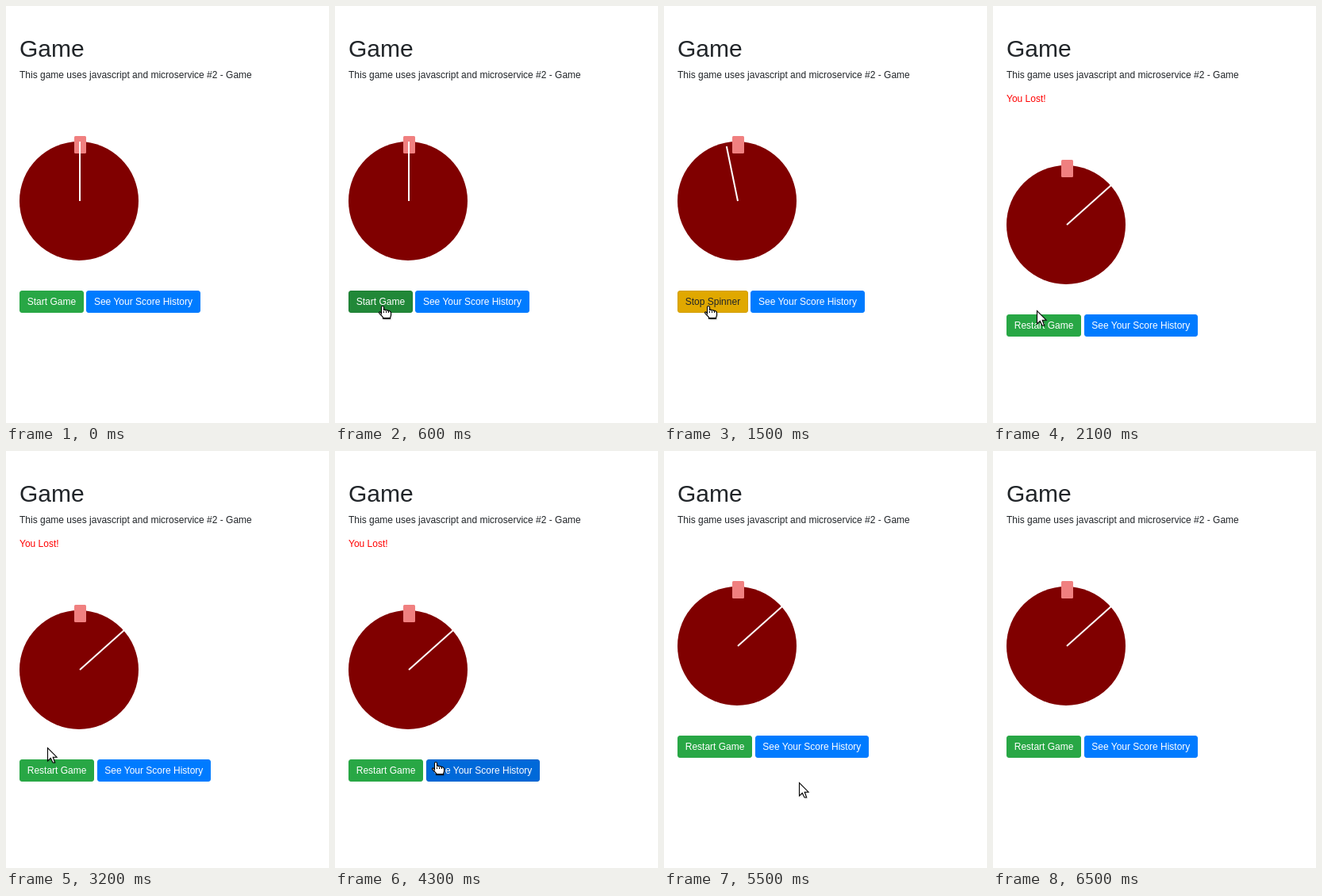
Animation of 407x526 px, one loop 7300 ms. Source, as an HTML page with a canvas:

```html
<!DOCTYPE html>
<html lang="en">
<head>
<meta charset="utf-8">
<title>Game</title>
<style>
  html, body { margin: 0; width: 100%; height: 100%; overflow: hidden; background: #fff; }
  body { position: relative; font: 12px/18px "Liberation Sans", Arial, sans-serif; color: #212529; }
  h1, p, .row, canvas { position: absolute; margin: 0; white-space: nowrap; }
  h1 { left: 17px; top: 36px; font-size: 30px; line-height: 36px; font-weight: 400; }
  p { left: 17px; top: 78px; }
  #lost { top: 108px; color: #f00; }
  .row { left: 17px; display: flex; gap: 3.33px; }
  .row span { padding: 4px 8.75px; border: 1px solid; border-radius: 3px; color: #fff; }
  canvas { left: 0; top: 0; }
</style>
</head>
<body>
<h1>Game</h1>
<p>This game uses javascript and microservice #2 - Game</p>
<p id="lost">You Lost!</p>
<div class="row" id="row"><span id="play"></span><span id="history">See Your Score History</span></div>
<canvas id="stage" width="407" height="526"></canvas>
<script>
const LOOP = 7300, STEP = 100;
const SPIN_START = 1100, SPIN_END = 2000, LOST_END = 5200;
const SPIN_RATE = 0.871, REST_ANGLE = 48.2;
const get = id => document.getElementById(id);
const ctx = get('stage').getContext('2d');

// time, x, y and shape of the pointer; each entry holds until the next
const POINTER = [
  [200, 4, 404, 'arrow'], [300, 40, 396, 'arrow'], [400, 87, 381, 'hand'],
  [500, 70, 379, 'hand'], [600, 55, 378, 'hand'], [700, 51, 378, 'hand'],
  [2100, 55, 384, 'arrow'], [3200, 52, 374, 'arrow'], [3300, 51, 372, 'arrow'],
  [4100, 60, 375, 'arrow'], [4200, 91, 381, 'arrow'], [4300, 122, 392, 'hand'],
  [4400, 146, 398, 'hand'], [4500, 157, 400, 'hand'], [4900, 158, 401, 'hand'],
  [5100, 161, 401, 'hand'], [5200, 168, 404, 'arrow'], [5300, 170, 406, 'arrow'],
  [5500, 170, 418, 'arrow'], [5600, 170, 438, 'arrow'], [5700, 169, 456, 'arrow'],
  [5800, 168, 464, 'arrow'], [6000, 168, 471, 'arrow'], [6100, 160, 435, 'arrow'],
  [6200, 120, 325, 'arrow'], [6300, 58, 185, 'arrow'], [6400, 8, 75, 'arrow'],
  [6500, 0, 0, '']
];

const SHAPES = {
  arrow: new Path2D('M.5 .5V17L4.3 13.4L7 19H9.6L7.2 12.2H12Z'),
  hand: new Path2D('M3.5 10V2Q3.5 .5 5 .5T6.5 2V5.5Q8 4.5 9 6Q10.5 5 12 6.5' +
    'Q13.5 5.8 14.5 7.5Q15.5 8 15.5 9V12L14.5 15V16.5H5.5V14.5L1 10Q0 8.5 1 8T3.5 10Z')
};

function paint(el, fill, edge = fill, ink = '#fff') {
  el.style.background = fill;
  el.style.borderColor = edge;
  el.style.color = ink;
}

function drawButtons(t, lost) {
  const play = get('play');
  const focused = t >= 1000 && t < SPIN_START;
  get('lost').hidden = !lost;
  get('row').style.top = (lost ? 389 : 359) + 'px';
  play.style.boxShadow = focused ? '0 0 0 2px rgba(40,167,69,.4)' : 'none';
  if (t < SPIN_START) {
    play.textContent = 'Start Game';
    if (focused) paint(play, '#1e7e34', '#1c7430');
    else if (t >= 400) paint(play, '#218838', '#1e7e34');
    else paint(play, '#28a745');
  } else if (t < SPIN_END) {
    play.textContent = 'Stop Spinner';
    paint(play, '#e0a800', '#d39e00', '#212529');
  } else {
    play.textContent = 'Restart Game';
    paint(play, '#28a745');
  }
  const hover = t >= 4300 && t < LOST_END;
  paint(get('history'), hover ? '#0069d9' : '#007bff', hover ? '#0062cc' : '#007bff');
}

function drawWheel(t, lost) {
  const spinning = t > SPIN_START && t < SPIN_END;
  const angle = t >= SPIN_END ? REST_ANGLE : spinning ? (t - SPIN_START) * SPIN_RATE : 0;
  const length = spinning ? 70.5 : 75;
  ctx.save();
  ctx.translate(0, lost ? 30 : 0);
  ctx.fillStyle = '#800000';
  ctx.beginPath();
  ctx.arc(92, 246, 75, 0, Math.PI * 2);
  ctx.fill();
  ctx.fillStyle = '#f08080';
  ctx.beginPath();
  ctx.roundRect(86, 164, 15, 22, 1.5);
  ctx.fill();
  ctx.translate(93, 246);
  ctx.rotate(angle * Math.PI / 180);
  ctx.fillStyle = '#fff';
  ctx.fillRect(-1, -length, 2, length);
  ctx.restore();
}

function drawPointer(t) {
  const stop = POINTER.filter(p => p[0] <= t).pop();
  if (!stop || !stop[3]) return;
  const [, x, y, shape] = stop;
  ctx.save();
  ctx.translate(x, y);
  ctx.shadowColor = 'rgba(0,0,0,.3)';
  ctx.shadowBlur = 2;
  ctx.shadowOffsetX = ctx.shadowOffsetY = 1;
  ctx.fillStyle = '#fff';
  ctx.fill(SHAPES[shape]);
  ctx.shadowColor = 'transparent';
  ctx.strokeStyle = '#000';
  ctx.lineWidth = 1.1;
  ctx.stroke(SHAPES[shape]);
  if (shape === 'hand') {
    ctx.fillStyle = '#000';
    for (const dx of [6, 9, 12]) ctx.fillRect(dx, 7, 1, 2);
    ctx.fillRect(5, 15, 10, 1);
  }
  ctx.restore();
}

function draw(now) {
  const t = Math.floor(now % LOOP / STEP) * STEP;
  const lost = t >= SPIN_END && t < LOST_END;
  ctx.clearRect(0, 0, 407, 526);
  drawButtons(t, lost);
  drawWheel(t, lost);
  drawPointer(t);
}

const start = performance.now();
function tick() {
  draw(performance.now() - start);
  requestAnimationFrame(tick);
}
tick();
</script>
</body>
</html>
```
